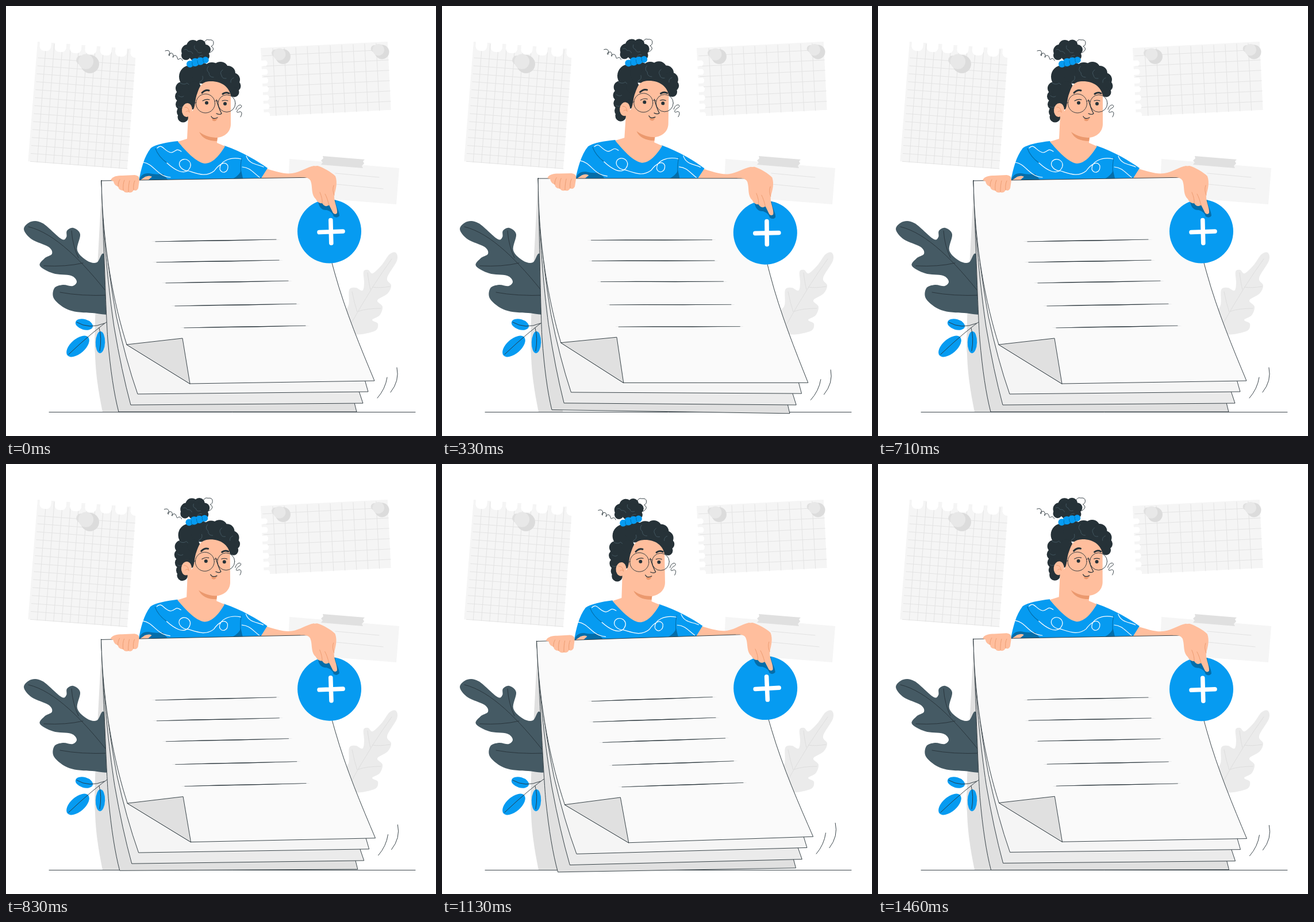
These frames come from a looping animation (748x748 px, 1.5 s). An HTML page with a canvas:

```html
<!DOCTYPE html>
<html lang="en">
<head>
<meta charset="utf-8">
<title>Add a note</title>
<style>
html, body { margin: 0; width: 100%; height: 100%; overflow: hidden; background: #fff; }
canvas { display: block; width: 100vw; height: 100vh; }
</style>
</head>
<body>
<canvas id="stage"></canvas>
<script>
const SIZE = 748, LOOP = 1500;
const INK = '#263238', BLUE = '#069bf1', NAVY = '#046da9', SLATE = '#455a64';
const SKIN = '#ffbe9d', TAN = '#eb996e';
const canvas = document.getElementById('stage');
const ctx = canvas.getContext('2d');
const ratio = window.devicePixelRatio || 1;
canvas.width = canvas.height = SIZE * ratio;

const toPath = p => typeof p === 'string' ? new Path2D(p) : p;

function fill(path, color) {
  ctx.fillStyle = color;
  ctx.fill(toPath(path));
}

function line(path, color = INK, width = 0.9) {
  ctx.strokeStyle = color;
  ctx.lineWidth = width;
  ctx.stroke(toPath(path));
}

function oval(x, y, rx, color, ry = rx, turn = 0) {
  const p = new Path2D();
  p.ellipse(x, y, rx, ry, turn, 0, Math.PI * 2);
  fill(p, color);
}

function ring(x, y, r, width) {
  const p = new Path2D();
  p.arc(x, y, r, 0, Math.PI * 2);
  line(p, INK, width);
}

// Closed smooth curve through the points, given as a flat x, y list.
function blob(list) {
  const n = list.length / 2, p = new Path2D();
  const at = i => { const k = (i + n) % n * 2; return [list[k], list[k + 1]]; };
  p.moveTo(...at(0));
  for (let i = 0; i < n; i++) {
    const [a, b, c, d] = [at(i - 1), at(i), at(i + 1), at(i + 2)];
    p.bezierCurveTo(b[0] + (c[0] - a[0]) / 6, b[1] + (c[1] - a[1]) / 6,
      c[0] - (d[0] - b[0]) / 6, c[1] - (d[1] - b[1]) / 6, c[0], c[1]);
  }
  p.closePath();
  return p;
}

function placed(x, y, turn, draw) {
  ctx.save();
  ctx.translate(x, y);
  ctx.rotate(turn);
  draw();
  ctx.restore();
}

function grid(w, h, x0, y0, dx, dy) {
  let d = '';
  for (let x = x0; x < w; x += dx) d += `M${x},2V${h}`;
  for (let y = y0; y < h; y += dy) d += `M3,${y}H${w}`;
  line(d, '#e2e2e2', 0.9);
}

function pin(x, y, r) {
  oval(x + 3, y + 2, r, '#dcdcdc');
  oval(x - r * 0.8, y - r * 0.3, r * 0.5, '#e0e0e0');
  oval(x - r * 0.25, y - r * 0.15, r * 0.82, '#e8e8e8');
}

function wall() {
  placed(55, 62, 0.075, () => {
    fill('M0,0H172V209H-1Z', '#f5f5f5');
    grid(172, 209, 15, 28, 14.3, 13.9);
    for (let i = 0; i < 7; i++) {
      const x = 14 + i * 26.4;
      fill(`M${x - 10},-2H${x + 10}V8Q${x + 8},16 ${x},15Q${x - 8},16 ${x - 10},8Z`, '#fff');
    }
  });
  pin(143, 99, 16);

  placed(443, 73, -0.05, () => {
    fill('M0,0H221V119H0Z', '#f5f5f5');
    grid(221, 119, 21, 14, 20, 18);
    for (let y = 27; y < 118; y += 15) fill(`M-2,${y - 5}H8Q13,${y} 8,${y + 5}H-2Z`, '#fff');
  });
  pin(479, 86, 13);
  pin(651, 78, 12.5);

  fill('M493,266L684,282L679,345L490,330Z', '#f5f5f5');
  line('M573,291L649,298M574,310L656,318', '#e0e0e0');
  fill('M551,261L624,267L621,270L623,274L619,278L621,282L548,276L551,272L548,269L552,265Z', '#e0e0e0');
}

function plants() {
  fill(blob([678, 429, 680, 443, 663, 473, 670, 486, 664, 500, 646, 512, 655, 523, 650, 538,
    637, 546, 647, 553, 640, 566, 600, 570, 585, 540, 596, 520, 597, 494, 608, 490, 620, 495,
    623, 482, 622, 462, 630, 459, 638, 465, 654, 450, 667, 432]), '#ebebeb');
  line('M671,440Q638,485 600,553M629,464Q631,482 634,493M668,488Q650,491 637,489' +
    'M602,497Q606,517 611,532M652,526Q628,526 613,531', '#dcdcdc');

  fill('M167,304C163,390 152,560 155,605C156,650 165,690 168,706H210V560Z', '#e0e0e0');

  fill(blob([31, 388, 44, 375, 64, 378, 96, 405, 105, 402, 106, 391, 117, 386, 129, 397, 124, 425,
    141, 443, 158, 446, 170, 431, 185, 470, 185, 531, 150, 534, 110, 529, 84, 510, 84, 491,
    99, 485, 116, 487, 123, 479, 113, 469, 82, 465, 59, 452, 67, 439, 80, 431, 74, 419,
    45, 406]), SLATE);
  line('M39,384C85,395 133,444 180,504M114,391Q116,418 126,438M66,452Q105,454 134,447' +
    'M94,498Q130,505 180,503');

  oval(136, 554, 15.5, BLUE, 9, 0.28);
  oval(125, 592, 24, BLUE, 12.5, -0.72);
  oval(164, 585, 8.2, BLUE, 19, 0.03);
  line('M184,543Q150,567 109,606M171,552Q145,563 123,550M162,560Q167,577 163,600');
}

function curls(list) {
  for (let i = 0; i < list.length; i += 3) oval(list[i], list[i + 1], list[i + 2], INK);
}

function head() {
  curls([316, 78, 11, 313, 86, 8, 325, 70, 11, 338, 68, 9.5, 347, 76, 9, 332, 82, 15, 346, 87, 8]);
  line('M345,64q2,-7 8,-5q8,-1 8,5q0,5 -4,6q6,4 2,8q-3,4 -8,3q1,6 -6,8');
  line('M277,78q8,-3 8,5q-1,7 -2,1q7,-5 8,2q0,6 -1,2q6,-5 8,2q1,5 3,2q5,-2 6,3');
  line('M310,76q5,-2 7,3q6,-1 8,4M328,69q-2,6 4,8q1,6 8,4M334,91q2,-6 8,-5', SLATE);

  curls([321, 123, 20, 306, 143, 11, 304, 157, 10, 305, 171, 10, 307, 184, 10, 308, 193, 9.5,
    320, 155, 17, 341, 117, 18, 358, 113, 15, 373, 111, 14, 386, 117, 13, 395, 128, 12,
    399, 139, 9.5, 397, 150, 8.5, 360, 126, 20, 324, 172, 8, 382, 134, 17]);
  line('M303,134q7,4 12,0q6,7 13,2q8,3 10,-5q6,-2 4,-9M352,105q-5,6 1,11q0,8 8,8' +
    'M377,111q-6,4 -2,10q1,6 8,5M396,125q-6,2 -5,8M300,156q5,4 9,1M300,175q4,3 7,0', SLATE);
  curls([328, 142, 11]);

  fill('M317,190L324,183C330,176 328,163 333,151C337,141 339,132 354,131C374,130 388,140 391,156' +
    'V205C391,218 382,227 368,229L367,238L381,244C372,259 360,274 346,274C330,272 312,251 299,236' +
    'L315,231Z', SKIN);
  oval(315, 181, 9, SKIN, 12, 0.1);
  line('M311,176q7,-1 8,9M313,184q3,-3 6,0', TAN);
  fill('M336,219C347,227 358,229 368,229L367,235C352,235 341,230 336,219Z', TAN);

  ring(347, 169.5, 16.5, 0.9);
  ring(384, 169.5, 15, 0.9);
  line('M363,166Q366,163 369,166M331,168L322,171');
  oval(349, 168.5, 3, INK);
  oval(381, 170, 3, INK);
  line('M342,165Q348,161 354,163M376,165Q381,163 386,165', INK, 1.1);
  line('M341,151Q347,145 353,147M377,153Q382,149 388,152', INK, 3);
  line('M366,163Q370,178 375,187Q372,190 366,187', INK, 1.2);
  fill('M358,194Q362,198 368,195Q365,203 359,199Z', TAN);
  line('M357,192Q360,198 368,194', INK, 1.3);
  line('M400,180C403,168 414,172 408,177C401,180 399,188 406,184C411,183 411,188 408,193');

  for (const [x, y, r] of [[320, 101, 6], [329, 98, 7.2], [338, 96, 6.8], [347, 94, 5.8]]) oval(x, y, r, BLUE);
  line('M324,98q-1,5 2,8M333,95q0,5 2,7M343,92q-1,5 2,7', NAVY);
}

function body() {
  fill('M447,281C470,288 485,293 498,291C512,289 524,280 536,278L560,288V303H440Z', SKIN);
  fill('M299,235C280,237 260,241 252,247C240,262 235,284 231,304H441L455,282' +
    'C438,270 412,254 380,243C372,258 360,272 346,273C330,270 312,251 299,235Z', BLUE);
  fill('M231,304Q235,290 249,291Q260,294 273,292L283,304Z', NAVY);
  fill('M386,304Q404,298 409,286L413,304Z', NAVY);
  line('M260,248Q265,262 280,273M410,264Q407,279 409,295', NAVY, 1.1);
  line('M263,247C272,238 275,253 287,255C296,254 295,246 305,253' +
    'M239,272C258,275 262,296 286,298' +
    'M280,273C292,284 310,296 319,283C327,271 311,261 303,270C298,278 307,287 318,287' +
    'C334,292 348,298 362,287C370,276 381,268 386,278C387,290 375,293 372,284C371,270 390,262 409,266' +
    'M411,280C425,281 430,290 441,298M418,261C423,276 438,275 448,280', '#fff', 1.2);
  fill('M232,304L242,297Q250,294 254,297L246,304Z', SKIN);
  head();
}

function sheet(path, color) {
  fill(path, color);
  line(path);
}

function pages() {
  sheet('M166,304C170,410 174,540 177,580Q184,660 196,706L610,706L606,690L300,400Z', '#e0e0e0');
  sheet('M166,304C170,410 178,490 188,558Q201,635 217,694L621,691L614,670L300,400Z', '#ebebeb');
  sheet('M166,304C170,400 180,474 192,540Q208,615 229,675L630,671L624,650L300,400Z', '#f5f5f5');
  sheet('M166,304L541,298C548,380 565,440 572,465C590,530 618,597 641,652L320,657L210,589' +
    'C188,520 168,420 166,304Z', '#fafafa');
  sheet('M210,589L307,578L320,657Z', '#e0e0e0');

  for (const [x, y, w] of [[252, 410, 226], [254, 446, 229], [270, 482, 229], [286, 522, 227], [302, 560, 227]]) {
    fill(`M${x},${y}L${x + w * 0.3},${y - 2}L${x + w},${y - 4}L${x + w * 0.6},${y - 1.6}Z`, INK);
    line(`M${x + 8},${y - 0.1}L${x + w - 8},${y - 3.9}`, INK, 0.7);
  }
}

function button() {
  oval(562.5, 392, 55.5, BLUE);
  line('M545,393.5L586,392M564.8,372.5L565.8,412.5', '#fff', 7.6);
  fill('M543,341Q546,356 558,355Q568,358 570,366Q576,370 580,365C580,356 573,348 573,338Q558,334 543,341Z', NAVY);
}

function hands() {
  fill('M512,298C524,294 526,278 542,278C552,281 566,289 573,296C577,307 574,318 571,329' +
    'C570,340 577,351 576,360Q573,364 569,360L562,346C557,350 553,348 550,343' +
    'C545,344 541,340 539,336C531,329 533,316 531,308Q530,299 519,298Z', SKIN);
  line('M550,343Q551,336 546,324M562,347Q559,334 555,327M571,329Q567,320 570,312', TAN);
  fill('M182,303C185,296 194,295 202,295L224,294Q233,295 232,303L230,317Q227,323 222,320' +
    'Q219,326 213,324Q207,326 204,321Q196,321 195,314Q188,312 187,305Z', SKIN);
  line('M195,314Q195,306 198,302M204,321Q203,309 206,303M213,323Q213,311 215,304M222,320Q221,310 224,304', TAN);
}

// Steady swing between +1 and -1 degree, clockwise first.
function swing(t) {
  const degrees = Math.asin(Math.sin((t + 20) / LOOP * 2 * Math.PI)) * 2 / Math.PI;
  return (degrees - 0.053) * Math.PI / 180;
}

function draw() {
  const t = performance.now() % LOOP;
  ctx.setTransform(ratio, 0, 0, ratio, 0, 0);
  ctx.lineCap = ctx.lineJoin = 'round';
  ctx.fillStyle = '#fff';
  ctx.fillRect(0, 0, SIZE, SIZE);
  wall();
  plants();
  line('M75,706.5H712');

  ctx.translate(424, 382);
  ctx.rotate(swing(t));
  ctx.translate(-424, -382);
  body();
  pages();
  button();
  hands();
  line('M680,629Q685,652 669,672M663,646Q660,666 646,682');
  requestAnimationFrame(draw);
}
draw();
</script>
</body>
</html>
```
